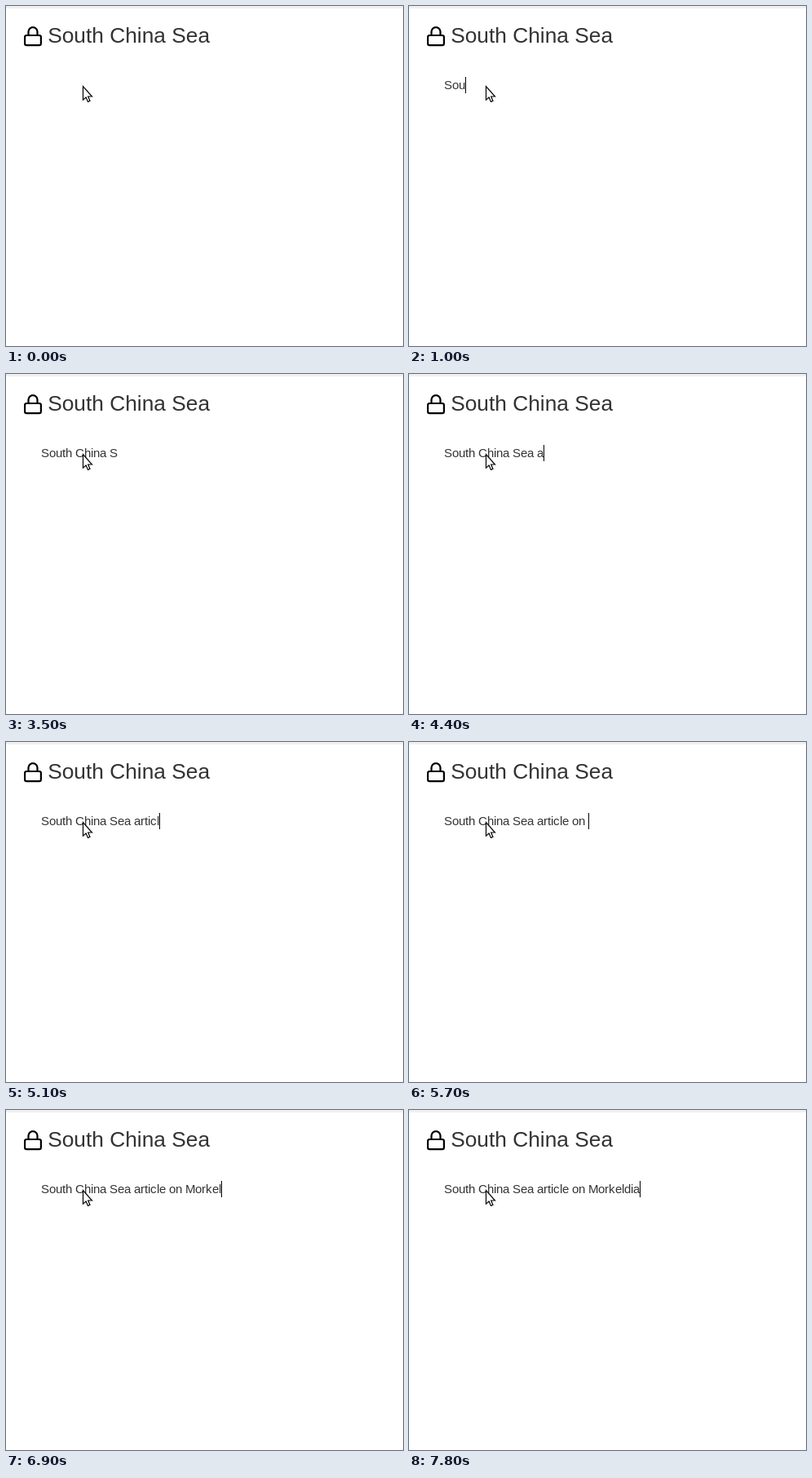
Recreate the animation shown at these times as an HTML page with a canvas. Size 487 px wide and 417 px high, loop 8 s.

```html
<!DOCTYPE html>
<html lang="en">
<head>
<meta charset="utf-8">
<title>Typing a link title</title>
<style>
  html, body { margin: 0; width: 100%; height: 100%; overflow: hidden; background: #fff; }
  canvas { display: block; }
</style>
</head>
<body>
<canvas id="stage" width="487" height="417"></canvas>
<script>
const ctx = document.getElementById('stage').getContext('2d');
const LOOP = 8000;
const FAMILY = '"Liberation Sans", Arial, sans-serif';
const INK = '#333';
const FOCUS_TIME = 400;
const BLINK = 500;

// Bursts of evenly paced typing, from first to last key press in ms.
const BURSTS = [
  { text: 'South C', from: 500, to: 1900 },
  { text: 'hina S', from: 2100, to: 3000 },
  { text: 'ea a', from: 3600, to: 4300 },
  { text: 'rticle on ', from: 4500, to: 5700 },
  { text: 'Morkeldia', from: 6000, to: 7300 }
];

// Key presses show on the next tenth of a second.
const keys = BURSTS.flatMap(({ text, from, to }) =>
  [...text].map((char, i) => {
    const exact = from + (to - from) * i / (text.length - 1);
    return { char, time: Math.round(exact / 100) * 100 };
  }));

const lockShackle = new Path2D('M7 11V7a5 5 0 0 1 10 0v4');
const pointer = new Path2D(
  'M94.5 98.5V115.2L98.1 112L100.5 117.5L103 116.4L100.7 111H105.5Z');

function drawLock() {
  ctx.save();
  ctx.translate(19.8, 23.9);
  ctx.scale(1.1, 1.1);
  ctx.strokeStyle = '#000';
  ctx.lineWidth = 2;
  ctx.lineCap = ctx.lineJoin = 'round';
  ctx.beginPath();
  ctx.roundRect(3, 11, 18, 11, 2);
  ctx.stroke();
  ctx.stroke(lockShackle);
  ctx.restore();
}

function drawHeader() {
  ctx.fillStyle = '#f0f0f0';
  ctx.fillRect(0, 0, 487, 3);
  drawLock();
  ctx.fillStyle = INK;
  ctx.font = `26.3px ${FAMILY}`;
  ctx.fillText('South China Sea', 51.2, 45);
}

// Glyphs advance by whole pixels; returns the x after the last one.
function drawTyped(text, x, baseline) {
  ctx.fillStyle = INK;
  ctx.font = `15px ${FAMILY}`;
  for (const char of text) {
    ctx.fillText(char, x, baseline);
    x += Math.round(ctx.measureText(char).width);
  }
  return x;
}

function drawField(time) {
  if (time < FOCUS_TIME) return;
  const typed = keys.filter(key => key.time <= time);
  const caretX = drawTyped(typed.map(key => key.char).join(''), 43, 102);
  const lastKey = typed.length ? typed[typed.length - 1].time : FOCUS_TIME;
  const finished = typed.length === keys.length;
  if (finished || time - lastKey < BLINK) {
    ctx.fillStyle = '#000';
    ctx.fillRect(caretX, 87, 1, 20);
  }
}

function drawPointer() {
  ctx.fillStyle = '#fff';
  ctx.strokeStyle = '#000';
  ctx.lineWidth = 1.2;
  ctx.fill(pointer);
  ctx.stroke(pointer);
}

const start = performance.now();

function frame() {
  const time = (performance.now() - start) % LOOP;
  ctx.fillStyle = '#fff';
  ctx.fillRect(0, 0, 487, 417);
  drawHeader();
  drawField(time);
  drawPointer();
  requestAnimationFrame(frame);
}
frame();
</script>
</body>
</html>
```
